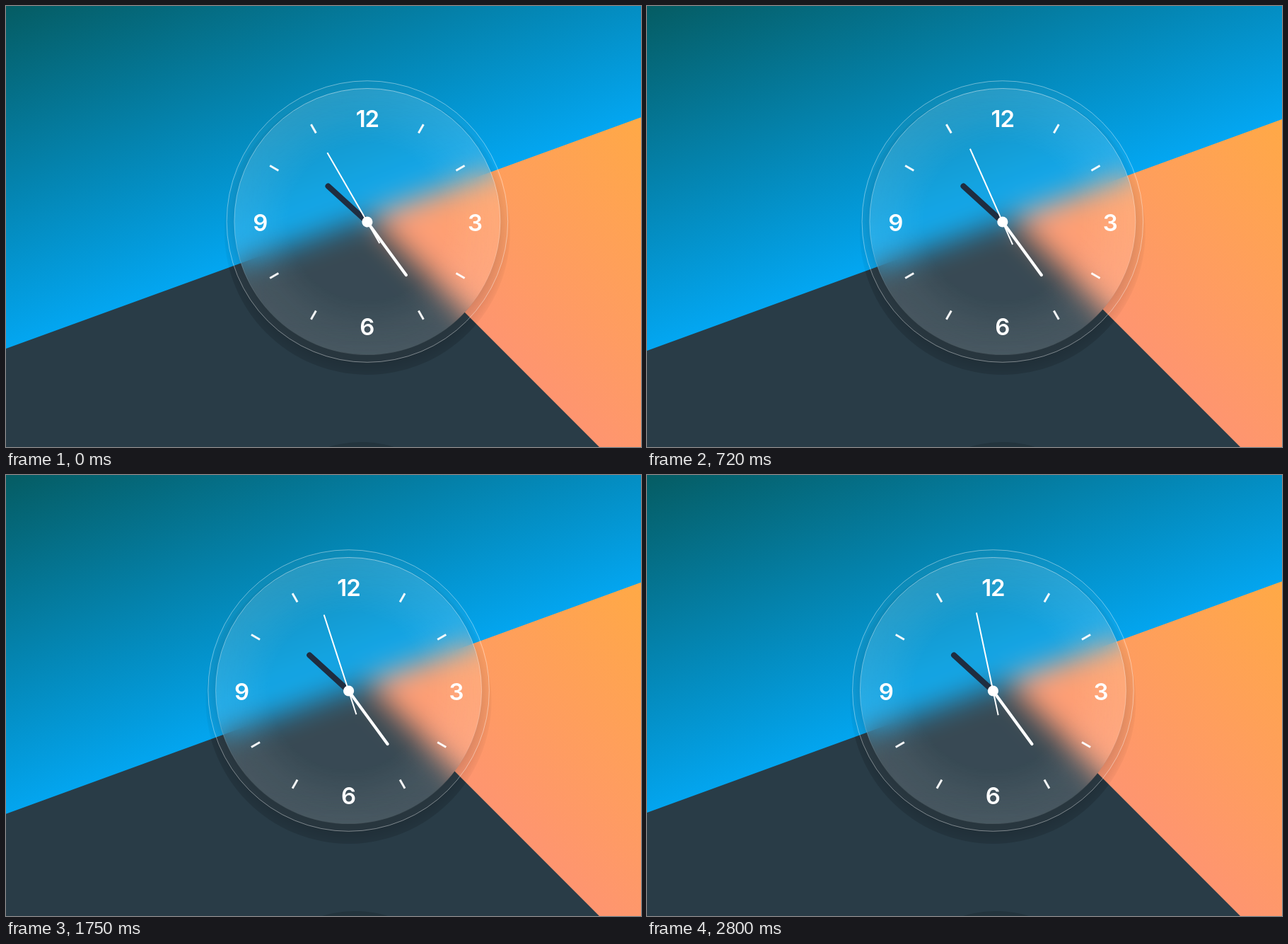
An HTML page that plays this animation: 898 by 623 pixels, repeating every 2900 ms.

```html
<!DOCTYPE html>
<html lang="en">
<head>
<meta charset="utf-8">
<title>Glass clock</title>
<style>
  html, body { margin: 0; width: 100%; height: 100%; overflow: hidden; background: #293c47; }
  svg { position: absolute; left: 0; top: 0; width: 898px; height: 623px; }
  .glass {
    position: absolute; left: -188px; top: 116.5px; width: 376px; height: 376px;
    border-radius: 50%;
    backdrop-filter: blur(20px);
    background: radial-gradient(circle, #ffffff12 0 110px, #ffffff1f 152px, #ffffff26 188px);
  }
  text { font: 600 33px Inter, "Open Sans", sans-serif; fill: #fff; text-anchor: middle; }
  #hand-second, #hand-minute { stroke: #fff; }
  #hand-minute, #hand-hour { stroke-linecap: round; }
</style>
</head>
<body>
<svg viewBox="0 0 898 623">
  <defs>
    <linearGradient id="sky" gradientUnits="userSpaceOnUse" x1="0" y1="0" x2="155.6" y2="427.7">
      <stop stop-color="#055c63"/><stop offset="1" stop-color="#03a6f1"/>
    </linearGradient>
    <linearGradient id="sand" gradientUnits="userSpaceOnUse" x1="532" y1="316" x2="794" y2="54">
      <stop stop-color="#fe9570"/><stop offset="1" stop-color="#ffa946"/>
    </linearGradient>
  </defs>
  <rect width="898" height="623" fill="#293c47"/>
  <circle id="smudge" cy="774" r="158" fill="#23343d"/>
  <path class="follow" fill="#000" fill-opacity=".1" fill-rule="evenodd"
    d="M-202 319a202 202 0 0 1 404 0a202 202 0 0 1-404 0zM-188 304.5a188 188 0 0 1 376 0a188 188 0 0 1-376 0z"/>
  <path fill="url(#sand)" d="M216 0L839 623H898V0z"/>
  <path id="blue" fill="url(#sky)"/>
</svg>

<div class="glass follow"></div>

<svg viewBox="0 0 898 623">
  <defs>
    <radialGradient id="shade" gradientUnits="userSpaceOnUse" cx="0" cy="319" r="202">
      <stop offset=".9" stop-opacity=".14"/><stop offset="1" stop-opacity=".03"/>
    </radialGradient>
    <linearGradient id="rim" x1="0" y1="0" x2="0" y2="1">
      <stop stop-color="#fff" stop-opacity=".5"/>
      <stop offset=".5" stop-color="#fff" stop-opacity=".35"/>
      <stop offset=".85" stop-color="#fff" stop-opacity="0"/>
    </linearGradient>
  </defs>
  <g class="follow">
    <path fill="url(#shade)" fill-rule="evenodd"
      d="M-202 319a202 202 0 0 1 404 0a202 202 0 0 1-404 0zM-188 304.5a188 188 0 0 1 376 0a188 188 0 0 1-376 0z"/>
    <circle cy="304.5" r="193.5" fill="none" stroke="#fff" stroke-opacity=".04" stroke-width="11"/>
    <circle cy="304.5" r="198.8" fill="none" stroke="#fff" stroke-opacity=".4"/>
    <circle cy="304.5" r="188" fill="none" stroke="url(#rim)"/>
    <text y="170.5" letter-spacing="-1">12</text>
    <text x="152.5" y="317.5">3</text>
    <text y="465">6</text>
    <text x="-151" y="317.5">9</text>
    <g transform="translate(0 305)">
      <g id="ticks" stroke="#fff" stroke-opacity=".95" stroke-width="3"></g>
      <path id="hand-hour" d="M0 0V-75" stroke="#1f2d40" stroke-width="8" transform="rotate(-47.6)"/>
      <path id="hand-minute" d="M0 0V-93" stroke-width="4.2" transform="rotate(143.8)"/>
      <path id="hand-second" d="M0 35V-113" stroke-width="2"/>
      <circle r="7.6" fill="#fff"/>
    </g>
  </g>
</svg>

<script>
  const LOOP = 2900;
  const SLOPE = 0.364;
  const steps = [0, 120, 240, 360, 480, 600, 720, 840, 980, 1120, 1240, 1390, 1510,
    1630, 1750, 1870, 2020, 2170, 2290, 2410, 2530, 2650, 2800];

  // [time, value] points, joined by straight lines
  const clockX = [[0, 510.9], [480, 506.1], [980, 499.3], [1240, 488], [1480, 486],
    [1750, 484.6], [1940, 484.2], [2290, 485], [2800, 489.4]];
  const horizon = [[980, 662.9], [1240, 648.3]];
  const smudgeX = [[980, 502.5], [1240, 493.5]];

  const $ = id => document.getElementById(id);
  const followers = document.querySelectorAll('.follow');

  function valueAt(points, t) {
    const i = points.findIndex(p => p[0] > t);
    if (i === 0) return points[0][1];
    if (i < 0) return points[points.length - 1][1];
    const [t0, a] = points[i - 1], [t1, b] = points[i];
    return a + (b - a) * (t - t0) / (t1 - t0);
  }

  for (let hour = 0; hour < 12; hour++) {
    if (hour % 3 === 0) continue;
    const tick = document.createElementNS('http://www.w3.org/2000/svg', 'path');
    tick.setAttribute('d', 'M0-145V-159');
    tick.setAttribute('transform', `rotate(${hour * 30})`);
    $('ticks').append(tick);
  }

  function draw(t) {
    const x = valueAt(clockX, t);
    const left = valueAt(horizon, t) - 0.35 * x;
    const seconds = 55 + [120, 1120, 2120].filter(at => t >= at).length;
    followers.forEach(el => { el.style.transform = `translateX(${x}px)`; });
    $('smudge').setAttribute('cx', valueAt(smudgeX, t));
    $('blue').setAttribute('d', `M0 0H898V${left - 898 * SLOPE}L0 ${left}z`);
    $('hand-second').setAttribute('transform', `rotate(${seconds * 6})`);
  }

  const start = performance.now();
  let shown = -1;
  function frame() {
    const t = (performance.now() - start) % LOOP;
    const step = steps.filter(s => s <= t).pop();
    if (step !== shown) draw(shown = step);
    requestAnimationFrame(frame);
  }
  frame();
</script>
</body>
</html>
```
